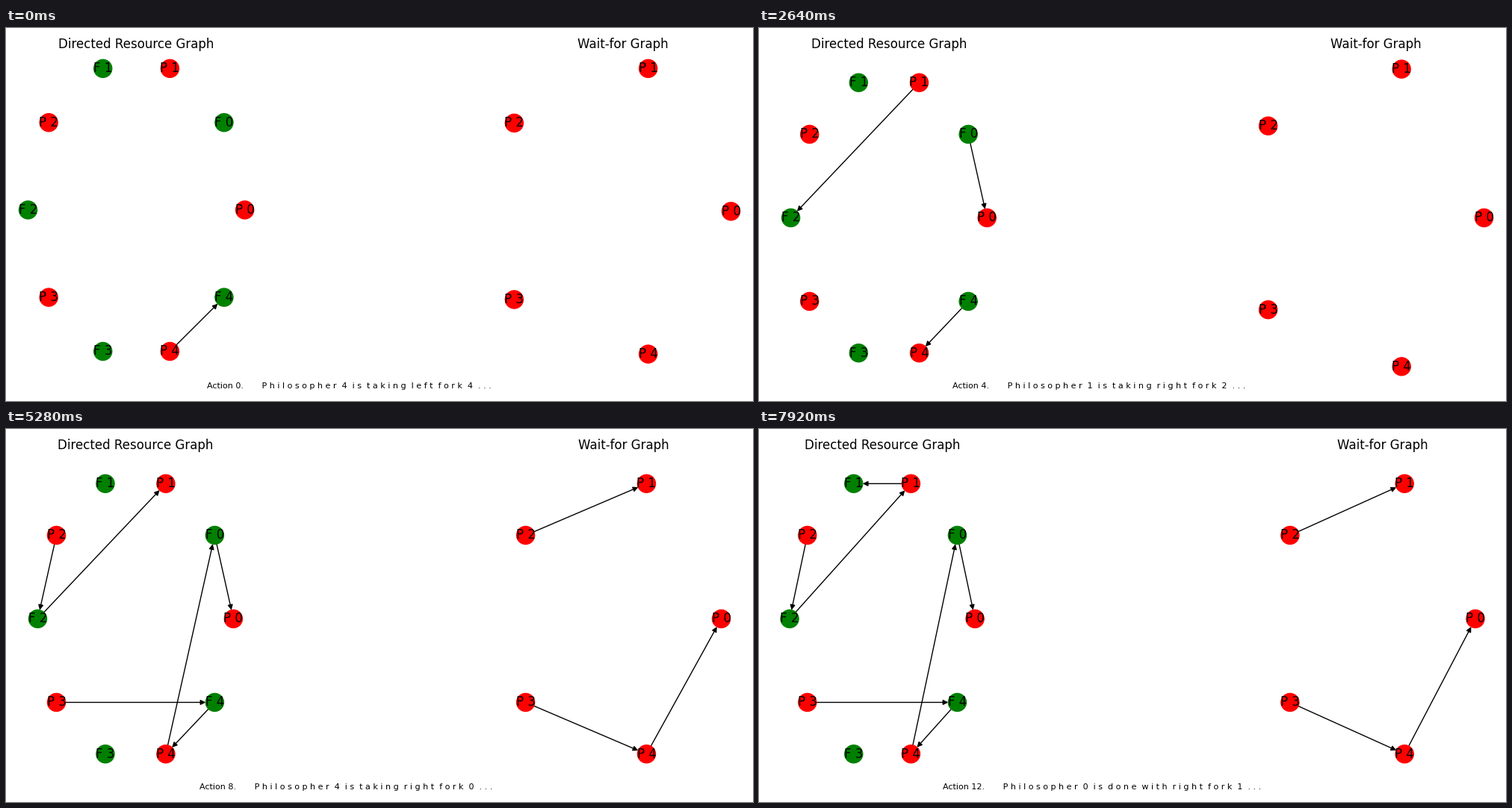
Animation of 1000x500 px, one loop 8 s. Source, as a matplotlib script:

```python
import numpy as np
import matplotlib.pyplot as plt
from matplotlib.animation import ArtistAnimation
from matplotlib.patches import FancyArrowPatch

plt.rcParams["font.family"] = "DejaVu Sans"

# Pixel layout
WIDTH, HEIGHT = 1000, 500
LEFT, RIGHT, TOP = 15, 985, 35.2
CAPTION_AT = (0.65, -1.2)      # in units of the resource graph
CAPTION_BASE = 483.1
CAPTION_PAD = 17.3
NODE_SIZE = 300
TICK, STEP, LOOP = 20, 660, 8000

# philosopher, verb, side
ACTIONS = [
    (4, "taking", "left"), (0, "taking", "left"), (4, "using", "left"),
    (0, "using", "left"), (1, "taking", "right"), (1, "using", "right"),
    (2, "taking", "left"), (3, "taking", "right"), (4, "taking", "right"),
    (0, "taking", "right"), (0, "using", "right"), (1, "taking", "left"),
    (0, "done with", "right"),
]


def ring(names):
    angles = 2 * np.pi * np.arange(len(names)) / len(names)
    return {n: np.array([np.cos(a), np.sin(a)]) for n, a in zip(names, angles)}


RESOURCE = ring([f"{kind} {i}" for i in range(5) for kind in "PF"])
WAITING = ring([f"P {i}" for i in range(5)])

fig = plt.figure(figsize=(WIDTH / 100, HEIGHT / 100), dpi=100, facecolor="white")
ax = fig.add_axes([0, 0, 1, 1])
ax.set_xlim(0, WIDTH)
ax.set_ylim(HEIGHT, 0)
ax.axis("off")


def limits(nodes, edges):
    """Lower and upper corner of the view: padded edges, then a 5% margin."""
    pts = np.array(list(nodes.values()))
    lo, hi = pts.min(0), pts.max(0)
    if edges:
        ends = np.array([nodes[n] for edge in edges for n in edge])
        pad = 0.05 * np.ptp(ends, axis=0)
        lo = np.minimum(lo, ends.min(0) - pad)
        hi = np.maximum(hi, ends.max(0) + pad)
    margin = 0.05 * (hi - lo)
    return lo - margin, hi + margin


def to_pixels(point, view, x0, w, h):
    lo, hi = view
    fx, fy = (np.asarray(point) - lo) / (hi - lo)
    return x0 + fx * w, TOP + (1 - fy) * h


def draw_graph(title, nodes, edges, view, x0, w, h):
    pos = {n: to_pixels(p, view, x0, w, h) for n, p in nodes.items()}
    art = [ax.text(x0 + w / 2, TOP - 8.33, title, size=12, ha="center")]
    for a, b in edges:
        arrow = FancyArrowPatch(pos[a], pos[b], arrowstyle="-|>", color="black",
                                mutation_scale=10, lw=1, zorder=1,
                                shrinkA=NODE_SIZE ** 0.5 / 2,
                                shrinkB=NODE_SIZE ** 0.5 / 2)
        art.append(ax.add_patch(arrow))
    xs, ys = zip(*pos.values())
    colors = ["red" if n[0] == "P" else "green" for n in pos]
    art.append(ax.scatter(xs, ys, s=NODE_SIZE, c=colors, zorder=2))
    art += [ax.text(x, y, n, size=12, ha="center", va="center", zorder=3)
            for n, (x, y) in pos.items()]
    return art


def caption(number, phil, verb, side, fork):
    words = f"Philosopher {phil} is {verb} {side} fork {fork} ...".split()
    spaced = "  ".join(" ".join(word) for word in words)
    return f"Action {number}." + " " * 7 + spaced


def update_edges(edges, phil, verb, fork):
    p, f = f"P {phil}", f"F {fork}"
    edges = [e for e in edges if e not in ((p, f), (f, p))]
    if verb == "taking":
        edges.append((p, f))
    elif verb == "using":
        edges.append((f, p))
    return edges


def build_scenes():
    scenes, edges, w = [], [], 325
    for number, (phil, verb, side) in enumerate(ACTIONS):
        fork = (phil + (side == "right")) % 5
        edges = update_edges(edges, phil, verb, fork)
        waits = [(a, d) for a, b in edges for c, d in edges
                 if a[0] == "P" and b == c]

        # The caption sets the gap between the graphs and their height
        text = ax.text(0, 0, caption(number, phil, verb, side, fork), size=8)
        view = lo, hi = limits(RESOURCE, edges)
        overhang = (hi[0] - CAPTION_AT[0]) / (hi[0] - lo[0]) * w
        gap = text.get_window_extent().width - overhang + CAPTION_PAD
        w = (RIGHT - LEFT - gap) / 2
        h = (CAPTION_BASE - TOP) * (hi[1] - lo[1]) / (hi[1] - CAPTION_AT[1])
        text.set_position(to_pixels(CAPTION_AT, view, LEFT, w, h))

        scenes.append(
            [text]
            + draw_graph("Directed Resource Graph", RESOURCE, edges, view,
                         LEFT, w, h)
            + draw_graph("Wait-for Graph", WAITING, waits,
                         limits(WAITING, waits), RIGHT - w, w, h))
    return scenes


scenes = build_scenes()
frames = [scenes[t // STEP] for t in range(0, LOOP, TICK)]
anim = ArtistAnimation(fig, frames, interval=TICK, repeat=True, repeat_delay=0)
plt.show()
```
